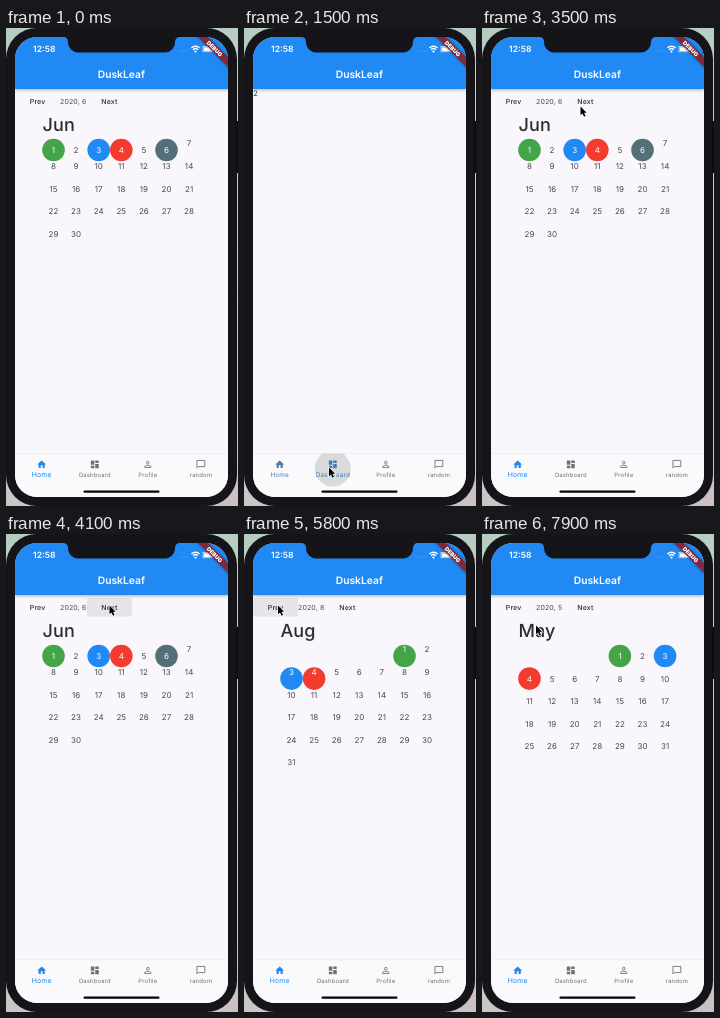
Animation of 232 by 478 pixels, one loop 8000 ms. Source, as an HTML page with a canvas:

```html
<!DOCTYPE html>
<html lang="en">
<head>
<meta charset="utf-8">
<title>Calendar app</title>
<style>
  html, body { margin: 0; width: 100%; height: 100%; overflow: hidden; }
  canvas { display: block; width: 232px; height: 478px; }
</style>
</head>
<body>
<canvas id="stage"></canvas>
<script>
const W = 232, H = 478, LOOP = 8000;
const canvas = document.getElementById('stage');
const ctx = canvas.getContext('2d');
const ratio = window.devicePixelRatio || 1;
canvas.width = W * ratio;
canvas.height = H * ratio;
ctx.textRendering = 'geometricPrecision';

const BLUE = '#2089f3', GREEN = '#43a547', RED = '#f43b30', SLATE = '#546e7a';
const PAPER = '#f9f7fc', INK = '#2c2c31', BEZEL = '#151418';

// centred: days up to this number sit in the middle of their cell
const months = {
  5: { name: 'May', days: 31, first: 4, centred: 31, marks: { 1: GREEN, 3: BLUE, 4: RED } },
  6: { name: 'Jun', days: 30, first: 0, centred: 6, marks: { 1: GREEN, 3: BLUE, 4: RED, 6: SLATE } },
  7: { name: 'Jul', days: 31, first: 2, centred: 0, marks: { 1: GREEN, 3: BLUE, 4: RED } },
  8: { name: 'Aug', days: 31, first: 5, centred: 0, marks: { 1: GREEN, 3: BLUE, 4: RED } }
};

const tabs = [
  { label: 'Home', x: 35.7, fill: 'M10 20v-6h4v6h5v-8h3L12 3 2 12h3v8z' },
  { label: 'Dashboard', x: 88.8, fill: 'M3 13h8V3H3zM3 21h8v-6H3zM13 21h8V11h-8zM13 3v6h8V3z' },
  { label: 'Profile', x: 141.8, line: 'M15 8a3 3 0 1 1-6 0a3 3 0 1 1 6 0zM5 19v-2c0-4 14-4 14 0v2z' },
  { label: 'random', x: 194.9, line: 'M3 3h18v14H6l-3 3z' }
];
for (const tab of tabs) tab.path = new Path2D(tab.fill || tab.line);

const tabTaps = [
  { press: 1080, release: 1400, tab: 1 },
  { press: 1900, release: 2050, tab: 2 },
  { press: 2450, release: 2560, tab: 3 },
  { press: 2750, release: 2860, tab: 0 }
];
const monthTaps = [
  { press: 3900, release: 4150, step: 1 },
  { press: 4770, release: 5000, step: 1 },
  { press: 5680, release: 5900, step: -1 },
  { press: 6370, release: 6460, step: -1 },
  { press: 6880, release: 7020, step: -1 }
];

// time, x, y of the pointer tip
const pointerPath = [
  [200, 236, 300], [950, 85, 439.5], [1700, 85, 439.5], [1900, 140, 439],
  [2300, 140, 439], [2450, 193, 439], [2560, 193, 439], [2750, 36, 439],
  [2880, 36, 439], [3300, 99, 97], [3500, 98.5, 78.5], [3700, 103.5, 71.5],
  [5480, 103.5, 71.5], [5680, 34, 71.5], [7600, 34, 71.5], [7900, 54, 91.5]
];
const arrow = new Path2D('M0 0V8.7L2 6.9L3.5 10.2L5 9.5L3.6 6.3H6.2Z');

const clamp = v => Math.max(0, Math.min(1, v));
const ease = v => v * v * (3 - 2 * v);
const lerp = (a, b, k) => a + (b - a) * k;

function text(str, x, y, size, color, weight = 400, align = 'center', spacing = 0) {
  ctx.font = `${weight} ${size}px Inter, sans-serif`;
  ctx.letterSpacing = spacing + 'px';
  ctx.textAlign = align;
  ctx.textBaseline = 'alphabetic';
  ctx.fillStyle = color;
  ctx.fillText(str, x, y + size * 0.364);
}

function box(x, y, w, h, color, radius = 0) {
  ctx.fillStyle = color;
  ctx.beginPath();
  ctx.roundRect(x, y, w, h, radius);
  ctx.fill();
}

function disc(x, y, r, color) {
  ctx.fillStyle = color;
  ctx.beginPath();
  ctx.arc(x, y, r, 0, 7);
  ctx.fill();
}

function drawButtons(t) {
  for (const { press, release, step } of monthTaps) {
    const glow = clamp((t - press) / 100) * clamp(1 - (t - release) / 230);
    if (glow) box(step > 0 ? 81 : 9, 64, 45, 18.5, `rgba(0,0,0,${0.08 * glow})`, 1);
  }
}

function drawCalendar(t) {
  const number = monthTaps.reduce((m, tap) => t >= tap.release ? m + tap.step : m, 6);
  const month = months[number];
  drawButtons(t);
  text('Prev', 23.8, 73, 7, INK, 450, 'left', 0.12);
  text('2020, ' + number, 54, 73, 7, '#4a4a4f', 400, 'left', 0.12);
  text('Next', 95.3, 73, 7, INK, 450, 'left', 0.12);
  text(month.name, 36.5, 96.3, 18, INK, 500, 'left', 0.1);
  for (let day = 1; day <= month.days; day++) {
    const cell = day - 1 + month.first;
    const x = 47.5 + cell % 7 * 22.6;
    const y = 122 + Math.floor(cell / 7) * 22.6;
    const mark = month.marks[day];
    if (mark) disc(x, y, 11.3, mark);
    text(day, x, day <= month.centred ? y : y - 6.6, 8, mark ? '#fff' : '#48484d', 400, 'center', 0.1);
  }
}

function drawTabs(t) {
  box(9, 425.5, 213, 44, '#faf9fc');
  box(9, 425.5, 213, 0.7, '#e9e7ec');
  ctx.save();
  ctx.beginPath();
  ctx.rect(9, 425.5, 213, 44);
  ctx.clip();
  const picked = [1, 0, 0, 0];
  let current = 0;
  for (const { press, release, tab } of tabTaps) {
    const fade = clamp(1 - (t - release - 100) / 220);
    if (t > press && fade) {
      const grow = ease(clamp((t - press) / 300));
      disc(tabs[tab].x, 440.5, 18 * grow, `rgba(0,0,0,${0.13 * fade})`);
    }
    if (t >= release) {
      const k = ease(clamp((t - release) / 200));
      picked[current] = 1 - k;
      picked[tab] = k;
      current = tab;
    }
  }
  ctx.restore();
  tabs.forEach((tab, i) => {
    const k = picked[i];
    const color = `rgb(${lerp(112, 32, k)},${lerp(112, 137, k)},${lerp(114, 238, k)})`;
    ctx.save();
    ctx.translate(tab.x - 5.3, 436.4 - 5.3);
    ctx.scale(0.44, 0.44);
    ctx.fillStyle = ctx.strokeStyle = color;
    ctx.lineWidth = 2;
    if (tab.fill) ctx.fill(tab.path); else ctx.stroke(tab.path);
    ctx.restore();
    text(tab.label, tab.x, 446.4, lerp(5.9, 6.9, k), color, 400, 'center', 0.15);
  });
  box(77.5, 462.4, 76, 2.4, '#050506', 1.2);
}

function drawAppBar() {
  ctx.save();
  ctx.shadowColor = 'rgba(0,0,0,.3)';
  ctx.shadowBlur = 3 * ratio;
  ctx.shadowOffsetY = ratio;
  box(9, 9, 213, 52, BLUE);
  ctx.restore();
  text('DuskLeaf', 115.3, 46.7, 10.3, '#fff', 600);
  text('12:58', 27, 21.3, 8.6, '#fff', 600, 'left');

  for (let i = 0; i < 4; i++) disc(174.5 + i * 2.4, 23, 0.6, 'rgba(255,255,255,.3)');
  ctx.strokeStyle = '#fff';
  ctx.lineWidth = 1.4;
  for (const r of [3.3, 5.7]) {
    ctx.beginPath();
    ctx.arc(189.5, 24, r, -2.36, -0.78);
    ctx.stroke();
  }
  disc(189.5, 23.6, 1.1, '#fff');
  ctx.lineWidth = 0.6;
  ctx.strokeRect(197, 18.4, 11.5, 5.4);
  box(197.8, 19.2, 9.8, 3.8, '#fff', 0.6);
}

function drawBanner() {
  ctx.save();
  ctx.translate(208.6, 20.6);
  ctx.rotate(Math.PI / 4);
  ctx.shadowColor = 'rgba(0,0,0,.5)';
  ctx.shadowBlur = 3 * ratio;
  box(-32, -3.3, 64, 6.6, '#7d2a3e');
  ctx.shadowColor = 'transparent';
  text('DEBUG', 0, 0, 5.6, '#fff', 900);
  ctx.restore();
}

function drawNotch() {
  ctx.fillStyle = BEZEL;
  ctx.beginPath();
  ctx.moveTo(57, 8);
  ctx.lineTo(57, 9);
  ctx.quadraticCurveTo(62, 9, 62, 14);
  ctx.arcTo(62, 24.5, 72, 24.5, 10);
  ctx.lineTo(159, 24.5);
  ctx.arcTo(169, 24.5, 169, 14, 10);
  ctx.quadraticCurveTo(169, 9, 174, 9);
  ctx.lineTo(174, 8);
  ctx.fill();
}

function drawPointer(t) {
  const next = pointerPath.findIndex(point => point[0] > t);
  if (next === 0) return;
  const to = pointerPath.at(next);
  const from = next < 0 ? to : pointerPath[next - 1];
  const k = ease(clamp((t - from[0]) / (to[0] - from[0] || 1)));
  ctx.save();
  ctx.translate(lerp(from[1], to[1], k), lerp(from[2], to[2], k));
  ctx.strokeStyle = '#fff';
  ctx.lineWidth = 1.3;
  ctx.stroke(arrow);
  ctx.fillStyle = '#000';
  ctx.fill(arrow);
  ctx.restore();
}

function draw(t) {
  ctx.setTransform(ratio, 0, 0, ratio, 0, 0);
  const backdrop = ctx.createLinearGradient(0, 0, W, H);
  backdrop.addColorStop(0, '#b4cdbf');
  backdrop.addColorStop(0.6, '#c3cfc8');
  backdrop.addColorStop(1, '#cdbfc2');
  box(0, 0, W, H, backdrop);
  box(0, 0, 231, H, BEZEL, 31);
  box(230, 93, 2, 52, '#0b0b0d');

  ctx.save();
  ctx.beginPath();
  ctx.roundRect(9, 9, 213, 460, 22);
  ctx.clip();
  box(9, 9, 213, 460, PAPER);
  const page = tabTaps.reduce((p, tap) => t >= tap.release ? tap.tab : p, 0);
  if (page) text(page + 1, 9.2, 65.4, 7.6, '#333338', 400, 'left');
  else drawCalendar(t);
  drawTabs(t);
  drawAppBar();
  drawBanner();
  ctx.restore();
  drawNotch();
  drawPointer(t);
}

function frame() {
  draw(performance.now() % LOOP);
  requestAnimationFrame(frame);
}
frame();
</script>
</body>
</html>
```
